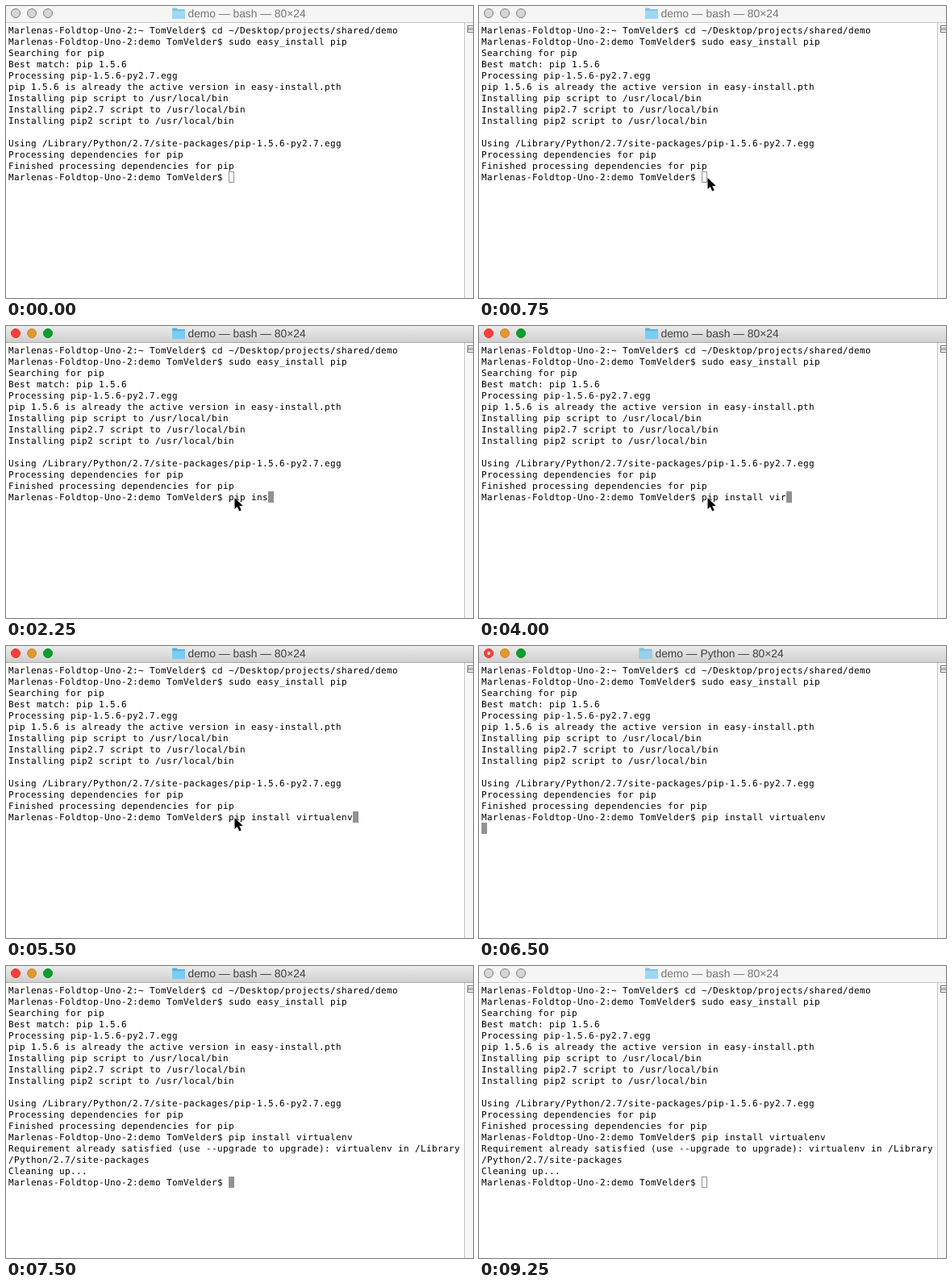
Animation, 579 px wide and 362 px high, one loop 10 s. Source, as an HTML page:

```html
<!DOCTYPE html>
<html lang="en">
<head>
<meta charset="utf-8">
<title>Terminal</title>
<style>
  html, body { margin: 0; width: 100%; height: 100%; overflow: hidden; background: #fff; }
  svg { display: block; width: 579px; height: 362px; }
  .term text {
    font: 11px "DejaVu Sans Mono", monospace;
    letter-spacing: .378px;
    white-space: pre;
    text-rendering: geometricPrecision;
  }
  #title { font: 13.8px "Liberation Sans", sans-serif; text-rendering: geometricPrecision; }
</style>
</head>
<body>
<svg viewBox="0 0 579 362" xmlns="http://www.w3.org/2000/svg">
  <defs>
    <linearGradient id="bar" x2="0" y2="1">
      <stop stop-color="#ebebeb"/><stop offset="1" stop-color="#d0d0d0"/>
    </linearGradient>
  </defs>
  <rect width="579" height="362" fill="#fff"/>

  <rect id="head" width="579" height="20"/>
  <rect id="rule" y="20" width="579" height="1"/>
  <g id="lights">
    <circle cx="12" cy="9" r="5.5"/>
    <circle cx="32" cy="9" r="5.5"/>
    <circle cx="52" cy="9" r="5.5"/>
  </g>
  <circle id="busy" cx="12" cy="9" r="2" fill="#fbe4e0"/>
  <g id="folder">
    <path d="M.5 3.5q0-1 1-1h4.5l1.5 1.5h8q1 0 1 1v10q0 1-1 1h-14q-1 0-1-1z" fill="#56b4e2"/>
    <path d="M.5 6h16v9q0 1-1 1h-14q-1 0-1-1z" fill="#7accf2"/>
  </g>
  <text id="title" y="14"></text>

  <rect x="568" y="21" width="11" height="341" fill="#f8f8f8"/>
  <rect x="568" y="21" width="1" height="341" fill="#c4c4c4"/>
  <path d="M572 24.5h7M572 27.5h7M572 29.5h7M572 32.5h7M572.5 24v9" stroke="#777" fill="none"/>

  <g class="term" id="lines"></g>
  <rect id="caret"/>
  <path id="mouse" d="M0 0v14l3.2-3 2.5 5.6 2.5-1.1-2.5-5.4h4.6z" stroke="#fff" stroke-width="1" paint-order="stroke"/>
</svg>

<script>
const LOOP = 10000, CELL = 7, LINE = 14, LEFT = 3, TOP = 23;
const HOST = "Marlenas-Foldtop-Uno-2", USER = "TomVelder";
const prompt = dir => `${HOST}:${dir} ${USER}$ `;
const COMMAND = "pip install virtualenv";

const history = [
  prompt("~") + "cd ~/Desktop/projects/shared/demo",
  prompt("demo") + "sudo easy_install pip",
  "Searching for pip",
  "Best match: pip 1.5.6",
  "Processing pip-1.5.6-py2.7.egg",
  "pip 1.5.6 is already the active version in easy-install.pth",
  "Installing pip script to /usr/local/bin",
  "Installing pip2.7 script to /usr/local/bin",
  "Installing pip2 script to /usr/local/bin",
  "",
  "Using /Library/Python/2.7/site-packages/pip-1.5.6-py2.7.egg",
  "Processing dependencies for pip",
  "Finished processing dependencies for pip"
];
const output = [
  "Requirement already satisfied (use --upgrade to upgrade): virtualenv in /Library",
  "/Python/2.7/site-packages",
  "Cleaning up...",
  prompt("demo")
];

// [start time, value]
const typed = [[0, 0], [1750, 2], [2000, 4], [2250, 7], [2500, 8], [2750, 9], [3000, 11],
  [3250, 12], [3500, 13], [4000, 15], [4250, 17], [4750, 18], [5000, 19], [5250, 21], [5500, 22]];
const pointer = [[0, null], [250, [330, 204]], [500, [296, 214]], [750, [283.5, 213]],
  [6250, [547.5, 156]], [6500, null]];
const ENTER = 5750, DONE = 7000, FOCUS = 1000, BLUR = 9250;

const $ = id => document.getElementById(id);
const set = (el, attrs) => { for (const k in attrs) el.setAttribute(k, attrs[k]); };
const at = (steps, t) => steps.filter(s => s[0] <= t).pop()[1];
const show = (el, on) => set(el, { visibility: on ? "visible" : "hidden" });

const rows = Array.from({ length: history.length + 1 + output.length }, (_, i) => {
  const row = document.createElementNS("http://www.w3.org/2000/svg", "text");
  set(row, { x: LEFT, y: TOP + 11 + i * LINE });
  return $("lines").appendChild(row);
});

function drawWindow(active, busy) {
  set($("head"), { fill: active ? "url(#bar)" : "#f5f5f5" });
  set($("rule"), { fill: active ? "#aaa" : "#c8c8c8" });
  const fills = active ? ["#fb3f3b", "#e0982f", "#0c9f2d"] : Array(3).fill("#d6d6d6");
  const edges = active ? ["#e8352f", "#cf8727", "#0a8f27"] : Array(3).fill("#808080");
  [...$("lights").children].forEach((c, i) => set(c, { fill: fills[i], stroke: edges[i] }));
  show($("busy"), busy);
  set($("folder"), {
    transform: `translate(${busy ? 198 : 205.5} 0)`,
    opacity: busy || !active ? .7 : 1
  });
  $("title").textContent = `demo — ${busy ? "Python" : "bash"} — 80×24`;
  set($("title"), { x: busy ? 218.5 : 225.5, fill: active ? "#404040" : "#777" });
}

function drawCaret(col, row, active) {
  const inset = active ? 0 : .5;
  set($("caret"), {
    x: LEFT + col * CELL + inset, y: TOP + row * LINE + inset,
    width: CELL - 2 * inset, height: LINE - 2 * inset,
    fill: active ? "#929292" : "none", stroke: active ? "none" : "#929292"
  });
}

function render(t) {
  const active = t >= FOCUS && t < BLUR;
  const busy = t >= ENTER && t < DONE;
  const text = [...history, prompt("demo") + COMMAND.slice(0, at(typed, t))];
  if (busy) text.push("");
  if (t >= DONE) text.push(...output);

  rows.forEach((row, i) => {
    const s = text[i] || "";
    if (row.textContent !== s) row.textContent = s;
  });
  drawWindow(active, busy);
  drawCaret(text[text.length - 1].length, text.length - 1, active);

  const pos = at(pointer, t);
  show($("mouse"), pos);
  if (pos) set($("mouse"), { transform: `translate(${pos})` });
}

const start = performance.now();
function tick() {
  render((performance.now() - start) % LOOP);
  requestAnimationFrame(tick);
}
tick();
</script>
</body>
</html>
```
